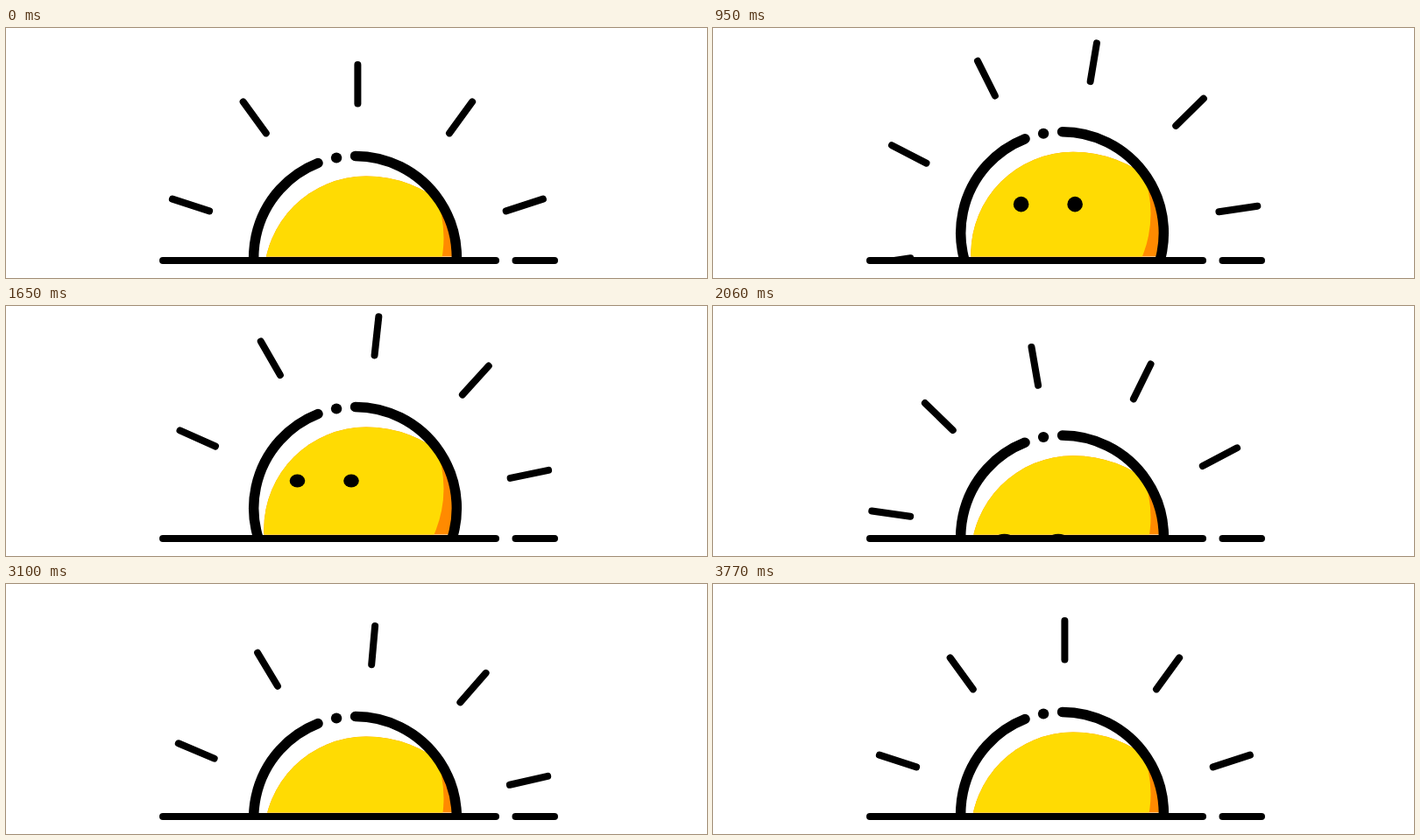
An HTML page for the animation above (3.8 s loop, 800x286 px).

```html
<!DOCTYPE html>
<html lang="en">
<head>
<meta charset="utf-8">
<title>Sunrise</title>
<style>
  html, body { margin: 0; width: 100%; height: 100%; overflow: hidden; background: #fff; }
  svg { display: block; width: 100%; height: 100%; }
  .line { fill: none; stroke: #000; stroke-linecap: round; }
</style>
</head>
<body>
<svg viewBox="0 0 800 286">
  <defs>
    <clipPath id="sky"><rect width="800" height="263.2"/></clipPath>
    <clipPath id="land"><rect width="800" height="261.5"/></clipPath>
    <clipPath id="disc"><circle cx="398.6" cy="262.2" r="115"/></clipPath>
    <clipPath id="lit"><circle cx="369.5" cy="240" r="130"/></clipPath>
    <path id="body" d="M294.3 300 V286.5 A116.7 117 0 0 1 411 169.5 A129 117 0 0 1 540 286.5 V300Z"/>
  </defs>
  <g clip-path="url(#land)">
    <g class="sun"><g clip-path="url(#disc)">
      <use href="#body" fill="#ff8a00"/>
      <use href="#body" fill="#ffdb03" clip-path="url(#lit)"/>
    </g></g>
  </g>
  <g clip-path="url(#sky)">
    <g id="rays" class="line" stroke-width="8"></g>
    <g class="sun">
      <path class="line" stroke-width="11.5" d="M398.6 146.4 A115.8 115.8 0 1 1 356 154.5"/>
      <ellipse cx="377.1" cy="148.4" rx="6.2" ry="6"/>
    </g>
    <ellipse class="eye" rx="8.8"/>
    <ellipse class="eye" rx="8.8"/>
  </g>
  <path class="line" stroke-width="8" d="M179 266 H559 M581.5 266 H626"/>
</svg>
<script>
const LOOP = 3800, LAST = 99;
const rays = document.getElementById('rays');
const suns = document.querySelectorAll('.sun');
const eyes = document.querySelectorAll('.eye');

rays.innerHTML = Array.from({ length: 10 }, (_, i) =>
  `<path d="M0 -178 V-222.4" transform="rotate(${i * 36})"/>`).join('');

const clamp = (value, low, high) => Math.min(high, Math.max(low, value));

// Steps last 30 ms, but every third of five is held 40 ms longer.
function stepAt(ms) {
  const rest = ms % 190;
  return Math.floor(ms / 190) * 5 + Math.floor((rest - clamp(rest - 60, 0, 40)) / 30);
}

function draw(ms) {
  const step = stepAt(ms % LOOP);
  const ramp = (from, to) => clamp((step - from) / (to - from), 0, 1);
  const rise = ramp(0, 28), fall = ramp(45, 57), recover = ramp(57, LAST);

  const sunY = -31 * rise + 43.6 * fall - 12.6 * recover;
  suns.forEach(sun => sun.setAttribute('transform', `translate(0 ${sunY})`));
  rays.setAttribute('transform', `translate(401.4 ${264.4 + sunY}) rotate(${180 * step / LAST})`);

  const eyeX = 348.5 + 3.5 * rise - 19.5 * ramp(29, 36);
  const eyeY = 270 - 70 * ramp(0, 25.6) + 85 * fall;
  const open = 3 + 5.8 * ramp(0, 24) - 5.8 * ramp(41, 50);
  eyes.forEach((eye, i) => {
    eye.setAttribute('cx', eyeX + i * 61.5);
    eye.setAttribute('cy', eyeY);
    eye.setAttribute('ry', open);
  });
}

const begin = performance.now();
function tick() {
  draw(performance.now() - begin);
  requestAnimationFrame(tick);
}
tick();
</script>
</body>
</html>
```
